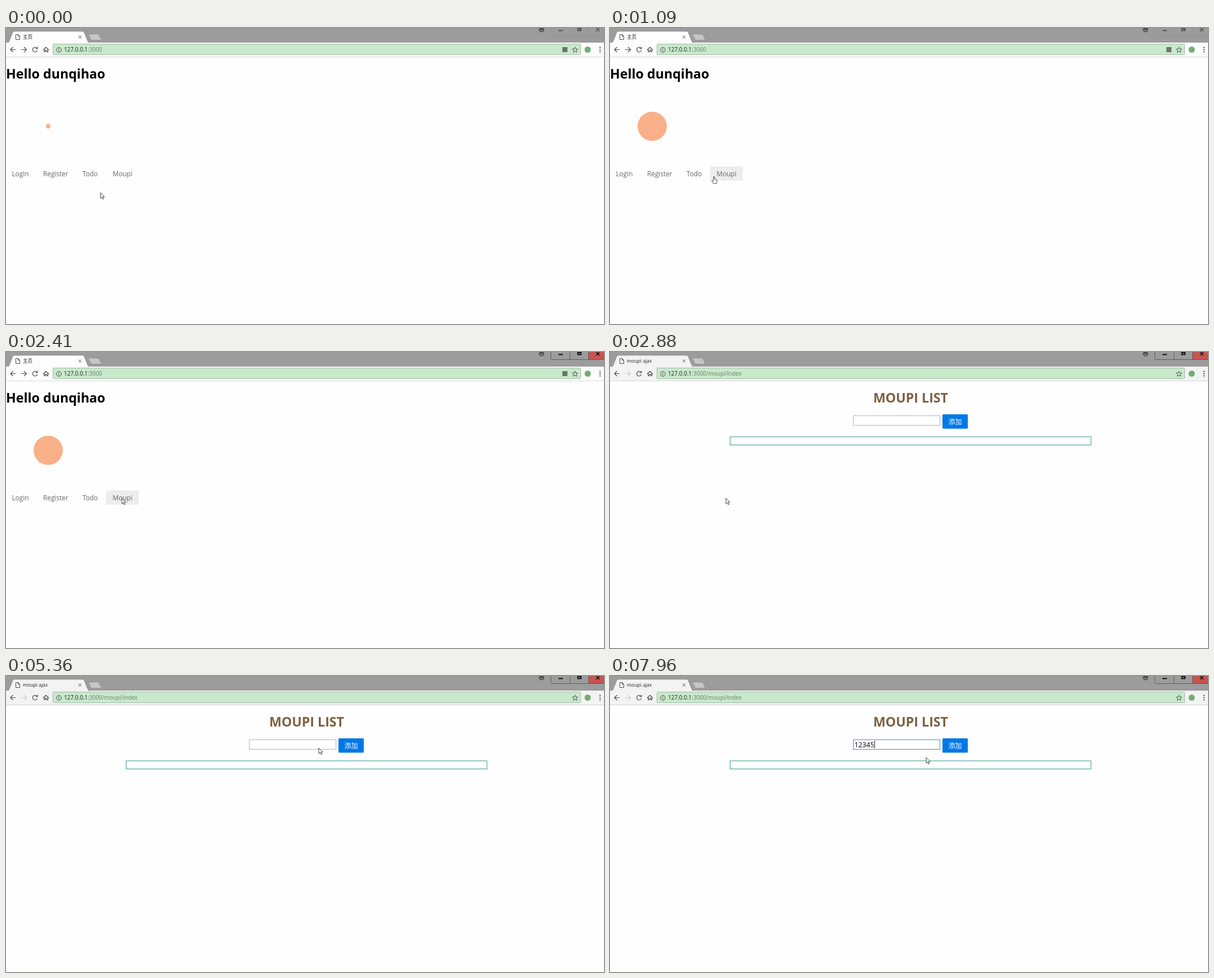
Animation, 1063 px wide and 527 px high, one loop 8000 ms. Source, as an HTML page:

```html
<!DOCTYPE html>
<html lang="zh">
<head>
<meta charset="utf-8">
<style>
html, body { margin: 0; width: 100%; height: 100%; overflow: hidden; background: #fefefe; }
svg { display: block; width: 1063px; height: 527px; font-family: "Open Sans", "Noto Sans", "Noto Sans CJK SC", "Noto Sans CJK", sans-serif; }
text { white-space: pre; }
.line { fill: none; stroke: #4b4b4b; stroke-width: 1.2; }
.thin { stroke-width: 1; }
.nav { font-size: 11.8px; fill: #686868; }
.url { font-size: 10px; fill: #6b7d6c; }
.tab { font-size: 8.6px; fill: #222; }
.title { font-size: 23.2px; font-weight: 700; }
</style>
</head>
<body>
<svg viewBox="0 0 1063 527">
  <!-- browser frame -->
  <path fill="#9c9c9c" d="M0 0H1063V26H0Z"/>
  <path id="bar" d="M0 26H1063V51H0Z"/>
  <path d="M0 51.5H1063" stroke="#d6d6d6"/>
  <path id="tab" stroke="#838383" stroke-width=".6" d="M3 26.4Q5 26 6 23L12 8Q13 6 15 6H136Q138 6 139 8L145 23Q146 26 148 26.4"/>
  <path fill="#c6c6c6" stroke="#858585" stroke-width=".6" d="M147 11H163Q164.5 11 165 12L169 20Q169.5 21.5 168 21.5H153Q151.5 21.5 151 20L146.5 12Q146 11 147 11Z"/>
  <path class="line thin" d="M17.5 11.5H21.5L24.5 14.5V20.5H17.5ZM21.5 11.5V14.5H24.5"/>
  <path class="line thin" d="M129 13.5L134 18.5M134 13.5L129 18.5"/>

  <!-- window buttons -->
  <circle cx="952" cy="3" r="4.7" fill="#505050"/>
  <path d="M949 4.3Q952 2.8 955 4.3Q952 7 949 4.3Z" fill="#9c9c9c"/>
  <path id="close" fill="#c75450" d="M1035 0H1063V13.5H1035Z"/>
  <path id="frame" fill="none" d="M968.5 0V11.5Q968.5 13.5 970.5 13.5H1063M1002.5 0V13.5M1035.5 0V13.5"/>
  <g id="marks" fill="none">
    <path stroke-width="2" d="M982 4.5H990M1016.5 0V4.5H1022V0M1016.5 1H1022"/>
    <path stroke-width="1.5" d="M1049 0L1055 6M1055 0L1049 6"/>
  </g>

  <!-- toolbar -->
  <path class="line" d="M17 38.5H8.5M12.5 34L8 38.5L12.5 43"/>
  <path class="line" id="forward" d="M27 38.5H36M32 34L36.5 38.5L32 43"/>
  <path class="line" d="M55 36A4.2 4.2 0 1 0 55.6 40M56 33.5V37H52.5"/>
  <path class="line" d="M66 39L71 34.3L76 39M68 38V42.5H70V39.5H72.5V42.5H74.5V38"/>
  <rect x="83.5" y="28.5" width="938" height="19" rx="1" fill="#c8e9cb" stroke="#a9bbaa"/>
  <circle class="line thin" cx="94" cy="39" r="4.3"/>
  <path class="line thin" d="M94 38V41.5M94 36V37"/>
  <text class="url" x="103" y="42"><tspan fill="#222">127.0.0.1</tspan>:3000<tspan id="path"></tspan></text>
  <path class="line thin" d="M1011.5 34L1012.9 37.2L1016.3 37.5L1013.7 39.8L1014.5 43.2L1011.5 41.4L1008.5 43.2L1009.3 39.8L1006.7 37.5L1010.1 37.2Z"/>
  <circle cx="1034" cy="38.5" r="5.5" fill="#6fae70"/>
  <path fill="#4b4b4b" d="M1055 33.5h2v2h-2zM1055 37.5h2v2h-2zM1055 41.5h2v2h-2z"/>

  <g id="home">
    <text class="tab" x="30" y="19">主页</text>
    <rect x="989" y="34" width="9" height="9" fill="#6b756c"/>
    <text class="title" x="0" y="90">Hello dunqihao</text>
    <circle id="dot" cx="75" cy="175" fill="#f9b089"/>
    <rect id="hover" x="178" y="246.5" width="58" height="25.5" fill="#ededed"/>
    <g class="nav">
      <text x="10.5" y="264">Login</text>
      <text x="66" y="264">Register</text>
      <text x="136" y="264">Todo</text>
      <text x="189.5" y="264">Moupi</text>
    </g>
  </g>

  <g id="list">
    <text class="tab" x="30" y="19">moupi ajax</text>
    <text class="title" x="534.5" y="90" text-anchor="middle" fill="#7b6142">MOUPI LIST</text>
    <rect id="input" x="432.5" y="113.5" width="154" height="17" fill="#fff"/>
    <text id="typed" x="434.5" y="127" font-size="12.3"></text>
    <path id="caret" d="M0 115V129" stroke="#222"/>
    <rect x="591" y="111" width="45" height="25.5" rx="1.5" fill="#0078e7"/>
    <text x="613.5" y="129" text-anchor="middle" font-size="12" fill="#fff">添加</text>
    <rect x="213.5" y="151" width="641.5" height="14.5" fill="none" stroke="#339994"/>
  </g>

  <g id="pointer" fill="#fff" stroke="#333" stroke-width=".9" stroke-linejoin="round">
    <path id="arrow" d="M0 0V10.2L2.3 8.1L4 11.8L5.6 11L4 7.5H7Z"/>
    <path id="hand" d="M-1 1Q0 -.5 1 1V5L4.5 6Q5.5 6.5 5.2 8L4 13H-1L-4 8.5Q-4 7 -2.5 7.5L-1 8.7Z"/>
    <path id="beam" fill="none" d="M-2 -6H2M0 -6V6M-2 6H2"/>
  </g>
</svg>
<script>
const $ = id => document.getElementById(id);
const set = (id, name, value) => $(id).setAttribute(name, value);
const show = (id, on) => set(id, "visibility", on ? "visible" : "hidden");

// the screen refreshes once per STEP ms; the times below count refreshes
const LOOP = 8000, STEP = 135, PULSE = 11.6;
const CLICK = 17, LOADED = 21, FOCUS = 44, LEAVE = 59;
const keyTimes = [52, 53, 54, 56, 58];

// pointer stops: step, x, y
const stops = [
  [0, 168, 293], [3, 174, 284], [7, 184, 267], [8, 185, 264], [12, 207, 260],
  [17, 206, 260], [26, 206, 260], [27, 235, 259], [34, 409, 454], [35, 430, 466],
  [36, 560, 400], [37, 680, 230], [38, 620, 150], [39, 556, 128], [42, 545, 121],
  [58, 545, 121], [59, 562, 145], [60, 562, 145]
];

function pointerAt(k) {
  const i = Math.max(1, stops.findIndex(s => s[0] >= k));
  const [a, ax, ay] = stops[i - 1], [b, bx, by] = stops[i];
  const f = (k - a) / (b - a);
  return [ax + (bx - ax) * f, ay + (by - ay) * f];
}

function draw(t) {
  const k = Math.floor((t + 20) / STEP);
  const home = k < LOADED, active = k >= CLICK, focused = k >= FOCUS;

  $("home").style.display = home ? "" : "none";
  $("list").style.display = home ? "none" : "";
  $("path").textContent = home ? "" : "/moupi/index";
  set("bar", "fill", home ? "#fdfdfd" : "#f3f3f3");
  set("tab", "fill", home ? "#fdfdfd" : "#f3f3f3");
  $("forward").style.stroke = home ? "" : "#c9c9c9";
  show("close", active);
  set("frame", "stroke", active ? "#5c5c5c" : "#8f8f8f");
  set("marks", "stroke", active ? "#111" : "#505050");

  set("dot", "r", Math.min(26, 4 + 6.2 * (k % PULSE)));
  show("hover", k >= 7);

  const count = keyTimes.filter(s => k >= s).length;
  $("typed").textContent = "12345".slice(0, count);
  set("input", "stroke", focused ? "#4a86dc" : "#b5b5b5");
  set("caret", "transform", `translate(${435.5 + 7 * count} 0)`);
  show("caret", focused && (k < 48 || k >= keyTimes[0]));

  const hand = k >= 7 && k <= CLICK, beam = k >= 40 && k < LEAVE;
  show("hand", hand);
  show("beam", beam);
  show("arrow", !hand && !beam);
  set("pointer", "transform", `translate(${pointerAt(k)})`);
}

const start = performance.now();
function tick() {
  draw((performance.now() - start) % LOOP);
  requestAnimationFrame(tick);
}
tick();
</script>
</body>
</html>
```
